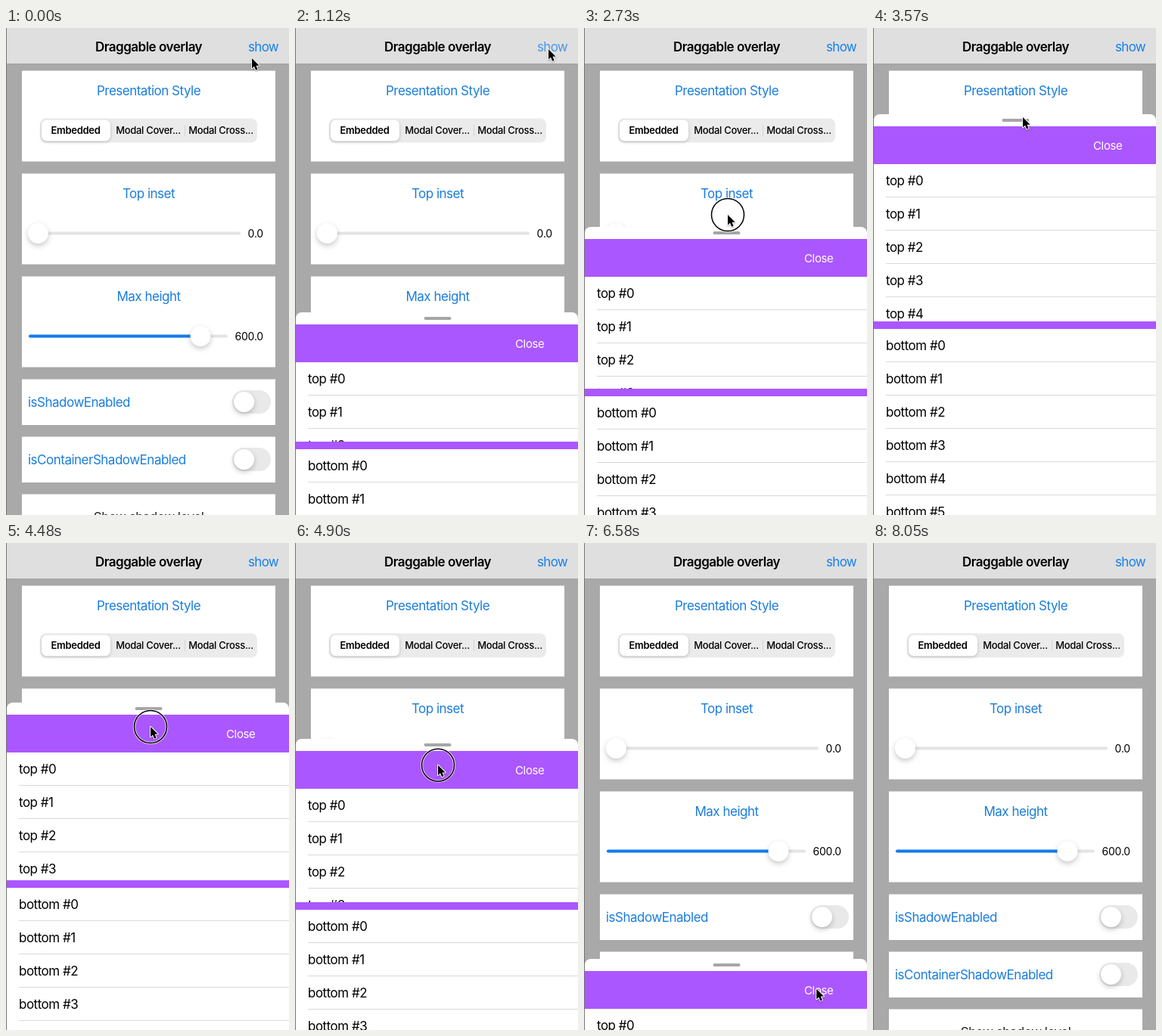
Write an HTML page with a canvas that moves like this. It is 374 px wide and 644 px high and loops after 8540 ms.

```html
<!DOCTYPE html>
<html lang="en">
<head>
<meta charset="utf-8">
<title>Draggable overlay</title>
<style>
html, body { margin: 0; width: 100%; height: 100%; overflow: hidden; background: #a9a9a9; }
canvas { display: block; width: 374px; height: 644px; }
</style>
</head>
<body>
<canvas id="stage"></canvas>
<script>
const W = 374, H = 644, LOOP = 8540, STEP = 70;
const BLUE = '#1a7ddd', PURPLE = '#ab57ff';
const REST = 371, LOW = 550;
const canvas = document.getElementById('stage');
const ctx = canvas.getContext('2d');
const dpr = window.devicePixelRatio || 1;
canvas.width = W * dpr;
canvas.height = H * dpr;

const linear = p => p;
const spring = p => 1 - Math.exp(-11.4 * p);
const easeOut = p => 1 - (1 - p) ** 3;
const smooth = p => p * p * (3 - 2 * p);

// [time, sheet top, easing towards this key]
const sheetKeys = [
  [910, 644], [1510, REST, spring], [2310, REST], [2730, 263], [3010, 152],
  [3150, 134], [3500, 114, easeOut], [3850, 114], [4480, 211], [5600, 340],
  [5740, 356], [6160, 500], [6440, LOW, easeOut], [7490, LOW], [7910, H, easeOut]
];

// [time, x, y, easing]
const cursorKeys = [
  [0, 325, 40], [560, 335, 28, smooth], [1120, 335, 28], [1820, 171, 359, smooth],
  [2170, 184, 374, smooth], [2310, 184, 374], [2730, 190, 247], [3010, 195, 140],
  [3150, 197, 122], [3500, 198, 118, easeOut], [3780, 198, 118], [3920, 197, 132],
  [4480, 191, 243], [5740, 185, 395], [6160, 184, 535], [6510, 296, 589, smooth],
  [6720, 312, 590, easeOut], [7070, 312, 590], [7210, 309, 590], [7490, 309, 590],
  [8050, 345, 664, smooth]
];

function sample(keys, t, col, easeCol) {
  if (t <= keys[0][0]) return keys[0][col];
  for (let i = 1; i < keys.length; i++) {
    const a = keys[i - 1], b = keys[i];
    if (t < b[0]) {
      const ease = b[easeCol] || linear;
      return a[col] + (b[col] - a[col]) * ease((t - a[0]) / (b[0] - a[0]));
    }
  }
  return keys[keys.length - 1][col];
}

function rect(x, y, w, h, color) {
  ctx.fillStyle = color;
  ctx.fillRect(x, y, w, h);
}

function pill(x, y, w, h, r, color) {
  ctx.fillStyle = color;
  ctx.beginPath();
  ctx.roundRect(x, y, w, h, r);
  ctx.fill();
}

function text(str, x, cy, { size = 17, weight = 400, color = '#000', align = 'left', track = -0.5 } = {}) {
  ctx.font = `${weight} ${size}px Inter, "Liberation Sans", sans-serif`;
  ctx.letterSpacing = track + 'px';
  ctx.textAlign = align;
  ctx.fillStyle = color;
  ctx.fillText(str, x, cy + size * 0.36);
}

function shadowed(blur, dy, alpha, draw) {
  ctx.save();
  ctx.shadowColor = `rgba(0,0,0,${alpha})`;
  ctx.shadowBlur = blur * dpr;
  ctx.shadowOffsetY = dy * dpr;
  draw();
  ctx.restore();
}

function knob(x, y, r) {
  shadowed(7, 3, 0.22, () => pill(x - r, y - r, r * 2, r * 2, r, '#fff'));
}

function card(y, h, title) {
  rect(21, y, 335, h, '#fff');
  if (title) text(title, 188.5, y + 26, { color: BLUE, align: 'center' });
}

function slider(y, right, thumb, fill, value) {
  pill(30, y - 2, right - 30, 4, 2, '#e4e4e4');
  if (fill) pill(30, y - 2, thumb - 30, 4, 2, '#137ced');
  knob(thumb, y, 13.5);
  text(value, 340, y, { size: 14, align: 'right', track: -0.2 });
}

function toggle(y, label) {
  card(y, 60.5);
  text(label, 29, y + 30, { color: BLUE });
  pill(299, y + 14.5, 51, 31, 15.5, '#e9e9e9');
  knob(314.5, y + 30, 13.5);
}

function drawPage(t) {
  rect(0, 0, W, H, '#a9a9a9');
  rect(0, 0, W, 47, '#dfdfdf');
  rect(0, 47, W, 1, '#a0a0a0');
  text('Draggable overlay', 188.5, 25, { weight: 600, align: 'center' });
  ctx.globalAlpha = t < 700 ? 1 : Math.min(1, 0.3 + 0.7 * Math.max(0, t - 980) / 220);
  text('show', 320, 25, { color: '#1680ee', track: -0.7 });
  ctx.globalAlpha = 1;

  card(56.5, 120, 'Presentation Style');
  pill(45, 119.5, 287, 32, 8, '#ebebeb');
  shadowed(4, 1.5, 0.2, () => pill(47, 121.5, 91, 28, 7, '#fff'));
  rect(236, 128, 1, 15, '#d6d6d6');
  const seg = { size: 13, align: 'center', track: -0.3 };
  text('Embedded', 92, 135.5, { ...seg, weight: 600 });
  text('Modal Cover...', 188, 135.5, { ...seg, weight: 500 });
  text('Modal Cross...', 284, 135.5, { ...seg, weight: 500 });

  card(192.5, 120, 'Top inset');
  slider(271.5, 310, 42.5, false, '0.0');
  card(328.5, 120, 'Max height');
  slider(407.5, 293, 257, true, '600.0');
  toggle(464.5, 'isShadowEnabled');
  toggle(540.5, 'isContainerShadowEnabled');
  card(616.5, 60);
  text('Show shadow level', 188.5, 647, { align: 'center', color: '#222' });
}

function list(name, top, bottom) {
  ctx.save();
  ctx.beginPath();
  ctx.rect(0, top, W, Math.max(0, bottom - top));
  ctx.clip();
  rect(0, top, W, bottom - top, '#fff');
  for (let i = 0, y = top; y < Math.min(bottom, H); i++, y += 44) {
    text(`${name} #${i}`, 17, y + 22);
    rect(17, y + 43, W - 17, 1, '#d9d9d9');
  }
  ctx.restore();
}

function drawSheet(t, y) {
  if (y >= H) return;
  // Presenting and dismissing slide the sheet without a new layout.
  const base = t < 2310 ? REST : Math.min(y, LOW);
  const split = Math.round(y + 319.6 - 0.4 * base);
  pill(1, y, W - 1, H - y + 20, [8, 8, 0, 0], '#fff');
  pill(170.5, y + 6, 36, 4, 2, '#a6a6a6');
  rect(1, y + 16, W - 1, 50, PURPLE);
  text('Close', 291, y + 41.5, { size: 15, color: '#fff', track: -0.35 });
  list('top', y + 66, split);
  rect(1, split, W - 1, 10, PURPLE);
  list('bottom', split + 10, H + 44);
}

function drawCursor(x, y, pressed) {
  if (pressed) {
    ctx.beginPath();
    ctx.arc(x, y, 21.5, 0, Math.PI * 2);
    ctx.strokeStyle = 'rgba(255,255,255,0.7)';
    ctx.lineWidth = 3.4;
    ctx.stroke();
    ctx.strokeStyle = '#000';
    ctx.lineWidth = 1.5;
    ctx.stroke();
  }
  ctx.save();
  ctx.translate(x, y);
  const arrow = new Path2D('M0 0V13.5L3 10.7L5.2 15.7L7.6 14.7L5.5 9.8H9.7Z');
  ctx.lineWidth = 2;
  ctx.lineJoin = 'round';
  ctx.strokeStyle = '#fff';
  shadowed(2, 1, 0.3, () => ctx.stroke(arrow));
  ctx.fillStyle = '#000';
  ctx.fill(arrow);
  ctx.restore();
}

function render(now) {
  const t = Math.floor((now % LOOP) / STEP) * STEP;
  const pressed = (t >= 2380 && t < 3150) || (t >= 3920 && t < 6160);
  ctx.setTransform(dpr, 0, 0, dpr, 0, 0);
  drawPage(t);
  drawSheet(t, Math.round(sample(sheetKeys, t, 1, 2)));
  rect(0, 0, 1, H, '#777');
  if (t < 8050) drawCursor(sample(cursorKeys, t, 1, 3), sample(cursorKeys, t, 2, 3), pressed);
}

const start = performance.now();
function tick() {
  render(performance.now() - start);
  requestAnimationFrame(tick);
}
tick();
</script>
</body>
</html>
```
